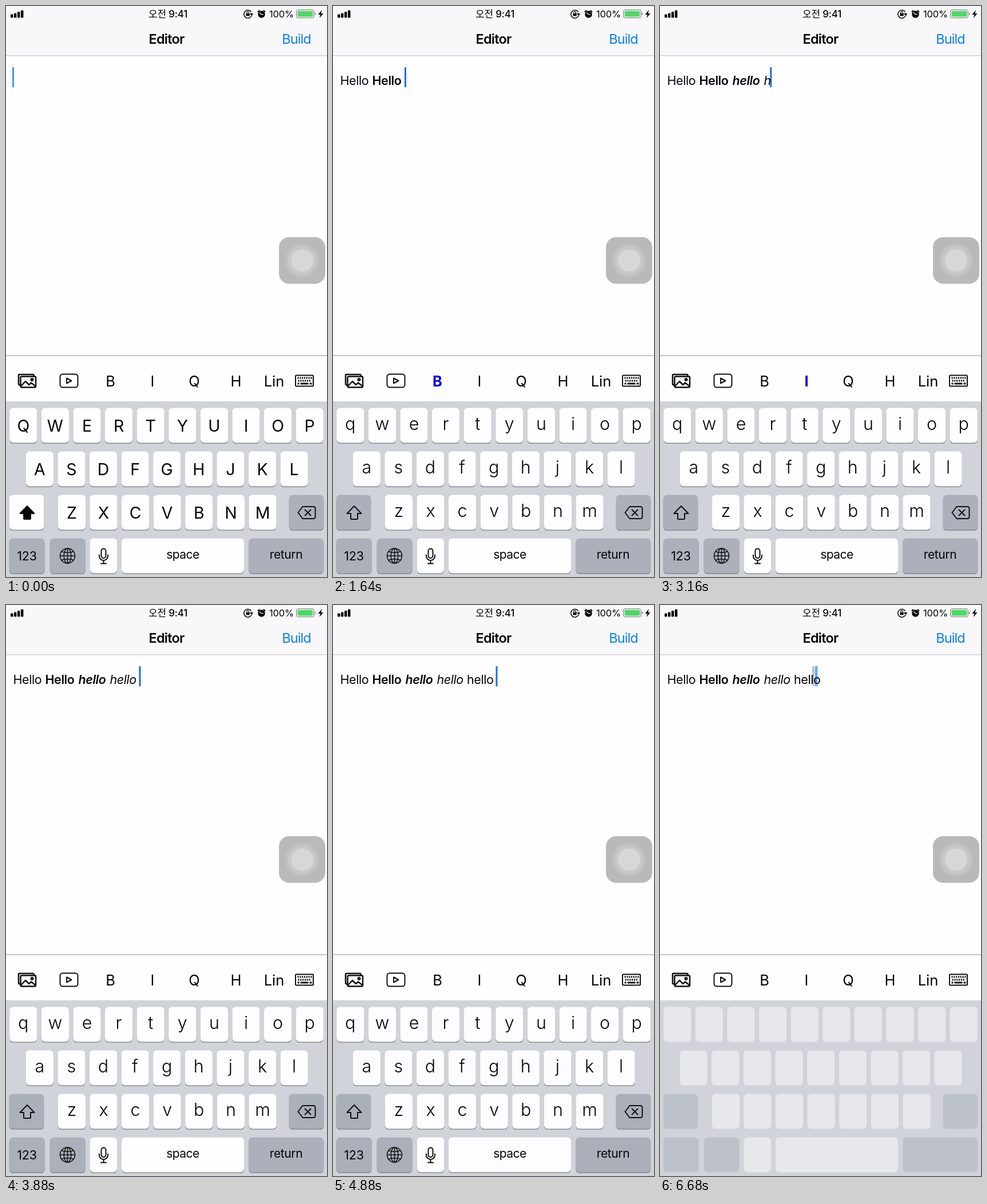
Recreate the animation shown at these times as an HTML page. Size 561x998 px, loop 6.72 s.

```html
<!DOCTYPE html>
<html lang="ko">
<head>
<meta charset="utf-8">
<title>Editor</title>
<style>
  html, body { margin: 0; width: 100%; height: 100%; overflow: hidden; background: #fefdff; }
  svg { display: block; width: 561px; height: 998px; }
  text { font-family: Inter, "Noto Sans CJK KR", "Noto Sans CJK", sans-serif; fill: #050506; white-space: pre; }
  .mid { text-anchor: middle; }
  .line { fill: none; stroke: #111; stroke-width: 2; stroke-linecap: round; stroke-linejoin: round; }
  #popup { filter: drop-shadow(0 1px 2px #0006); }
</style>
</head>
<body>
<svg viewBox="0 0 561 998">
  <rect width="561" height="998" fill="#fefdff"/>
  <rect width="561" height="86" fill="#f8f7f9"/>
  <rect y="86" width="561" height="1.5" fill="#cfced1"/>

  <!-- status bar -->
  <g id="signal"></g>
  <g class="line">
    <path d="M428.3 10A7 7 0 1 0 429 17.5M427 13.5h4l-1.5 2.5z" style="stroke-width:1.6"/>
    <path d="M420.8 13v-1.5a1.8 1.8 0 0 1 3.6 0V13" style="stroke-width:1.3"/>
  </g>
  <rect x="419.5" y="13" width="6.2" height="4.6" rx=".8"/>
  <circle cx="446.5" cy="14.5" r="6.2"/>
  <path d="M440.5 10l2-2M452.5 10l-2-2" class="line"/>
  <path d="M443.5 12l3 2.7h3" class="line" style="stroke:#f8f7f9;stroke-width:1.3"/>
  <rect x="507.7" y="6.7" width="30.6" height="14" rx="3.5" fill="none" stroke="#8c8c8e" stroke-width="1.3"/>
  <rect x="509.7" y="8.7" width="26.6" height="10" rx="2" fill="#4cd964"/>
  <path d="M539.8 11.5q2 .5 2 2.3t-2 2.3z" fill="#8c8c8e"/>
  <path d="M552 7l-6.5 8h4l-1.500 6 6.500-8h-4z"/>

  <!-- editor -->
  <rect id="ghost" y="107" width="3" height="35" fill="#b3b2b6"/>
  <rect id="caret" y="107" height="35"/>
  <g id="words"></g>
  <rect x="477" y="404" width="81" height="81.5" rx="18" fill="#b9b8ba"/>
  <circle cx="517.5" cy="445" r="30" fill="#c0bfc1"/>
  <circle cx="517.5" cy="445" r="25" fill="#c8c7c9"/>
  <circle cx="517.5" cy="445" r="19.5" fill="#d7d6d9"/>

  <!-- toolbar -->
  <rect y="610.5" width="561" height="1.3" fill="#a9a8ac"/>
  <g class="line">
    <g style="stroke-width:2.5">
      <path d="M25 662.500h-1.500l-1.500-1.500v-15.500q0-1.500 1.500-1.500h23.500q1.500 0 1.500 1.500v1.500"/>
      <rect x="25.500" y="647.500" width="26.500" height="19" rx="2"/>
      <path d="M26.500 664l7.500-8 6 6 4-3.500 7.500 6"/>
      <circle cx="45.500" cy="653" r="1.800"/>
    </g>
    <rect x="94.500" y="643.500" width="31" height="23" rx="4.500"/>
    <path d="M106 650.500v9l8.500-4.500z"/>
    <rect x="506" y="645.500" width="31" height="19" rx="1.500"/>
    <g style="stroke-width:3;stroke-linecap:butt">
      <path d="M509.500 650h25M510.500 655h23" stroke-dasharray="2.200 1.600"/>
      <path d="M509.500 660h3M514.500 660h14M530.500 660h4"/>
    </g>
  </g>
  <g id="tools"></g>

  <!-- keyboard -->
  <rect y="691" width="561" height="307" fill="#d1d3da"/>
  <g id="shadows"></g>
  <g id="keys"></g>
  <g id="glyphs">
    <path id="shift" class="line" d="M37 874l12.500 13h-6.500v8.500q0 1.500-1.500 1.500h-9q-1.500 0-1.500-1.500V887h-6.500z"/>
    <g class="line">
      <path d="M518.500 875h18.500q3.500 0 3.500 3.500v14q0 3.500-3.500 3.500h-18.500l-8-10.500z"/>
      <path d="M522.500 880.500l10 10M532.500 880.500l-10 10"/>
      <g style="stroke-width:1.500">
        <circle cx="107.500" cy="961" r="13"/>
        <ellipse cx="107.500" cy="961" rx="6.300" ry="13"/>
        <path d="M107.500 948v26M94.500 961h26M97 953.500q10.500 4 21 0M97 968.500q10.500-4 21 0"/>
      </g>
      <rect x="166.500" y="948.500" width="8" height="16.500" rx="4"/>
      <path d="M163 959.500v2a7.500 7.500 0 0 0 15 0v-2M170.500 969v5.500M166 974.500h9"/>
    </g>
  </g>
  <!-- balloon over a held key, origin at the top centre of the key -->
  <g id="popup">
    <path fill="#fefdff" d="M-24 54V14C-24 2-34 0-34-14V-66Q-34-77-23-77H23Q34-77 34-66V-14C34 0 24 2 24 14V54Q24 61 17 61H-17Q-24 61-24 54z"/>
  </g>
</svg>
<script>
const LOOP = 6720, BLUE = '#0000ea', DARK = '#abb0ba', WHITE = '#fefdff';
const KEY_W = 48.2, PITCH = 55.6;
const $ = id => document.getElementById(id);

function add(parent, tag, attrs, content = '') {
  const el = document.createElementNS('http://www.w3.org/2000/svg', tag);
  for (const k in attrs) el.setAttribute(k, attrs[k]);
  el.textContent = content;
  return ($(parent) || document.querySelector(parent)).appendChild(el);
}
const label = (parent, x, y, str, size, spacing = 0, more = {}) =>
  add(parent, 'text', { x, y, 'font-size': size, 'letter-spacing': spacing, class: 'mid', ...more }, str);

function addKey(x, y, w, fill = WHITE) {
  const box = { x, y, width: w, height: 61, rx: 6.5 };
  add('shadows', 'rect', { ...box, y: y + 1.6, fill: '#898b90' });
  return add('keys', 'rect', { ...box, fill });
}

// Static parts
[6, 8, 10.5, 13].forEach((h, i) =>
  add('signal', 'rect', { x: 8 + i * 6, y: 20.5 - h, width: 4.4, height: h, rx: 1.3 }));
label('svg', 283, 20, '오전 9:41', 17, -0.2, { 'font-weight': 500 });
label('svg', 481.5, 20, '100%', 16.5, -0.2);
label('svg', 280.5, 65.5, 'Editor', 23.5, -0.8, { 'font-weight': 600 });
label('svg', 507.5, 65.5, 'Build', 23.5, -0.9, { style: 'fill:#0a7ff0' });

const [toolB, toolI] = [['B', 182.5], ['I', 256], ['Q', 329], ['H', 402], ['Lin', 468.5]]
  .map(([s, x]) => label('tools', x, 664.5, s, 25.5));

const letters = [];
[['qwertyuiop', 6.2], ['asdfghjkl', 34.7], ['zxcvbnm', 90.8]].forEach(([row, left], r) =>
  [...row].forEach((ch, i) => {
    const x = left + i * PITCH, y = 702.5 + r * 76, mid = x + KEY_W / 2;
    addKey(x, y, KEY_W);
    letters.push({ ch, r, y, mid, el: label('glyphs', mid, 0, ch, 30) });
  }));

const shiftKey = addKey(5.7, 854.5, 60.6, DARK);
addKey(494.7, 854.5, 60.6, DARK);
addKey(5.7, 930.5, 62, DARK);
addKey(76.7, 930.5, 62, DARK);
addKey(146.7, 930.5, 47.3);
const spaceKey = addKey(202, 930.5, 214);
addKey(424.3, 930.5, 131, DARK);
label('glyphs', 36.5, 968.5, '123', 21.5, -0.2);
label('glyphs', 309, 966, 'space', 21, -0.5);
label('glyphs', 489.5, 966, 'return', 21, -0.4);
const popupText = label('popup', 0, -30, '', 45, 0, { 'font-weight': 300 });

// Typed words: left edge, time of the first letter, style
const STEP = 104, HOLD = 80;
const words = [
  { s: 'Hello', x: 12.5, at: 140 },
  { s: 'Hello', x: 68.5, at: 1120, bold: true },
  { s: 'hello', x: 126.5, at: 2340, bold: true, italic: true },
  { s: 'hello', x: 181.5, at: 3160, italic: true },
  { s: 'hello', x: 234, at: 4000 }
];
const stops = [];
for (const w of words) {
  w.el = add('words', 'text', {
    x: w.x, y: 138, 'font-size': 21.5, 'letter-spacing': -0.42,
    'font-weight': w.bold ? 600 : 400, 'font-style': w.italic ? 'italic' : 'normal'
  }, w.s);
  for (let j = 0; j < 6; j++) stops.push(w.x + (j && w.el.getSubStringLength(0, j)));
}
stops.push(stops[stops.length - 1] + 5.5);

// Character inserted when the key held at time t is released
function heldChar(t) {
  for (const w of words) {
    const j = Math.ceil((t - w.at) / STEP);
    if (j >= 0 && j < 6 && w.at + j * STEP - t <= HOLD) return (w.s + ' ')[j];
  }
  return '';
}

// Free caret movement while the keyboard acts as a trackpad
const LIFT = 4880;
const path = [[5100, 286], [5520, 146], [6120, 67], [6260, 9.5], [6680, 273], [LOOP, 276]];
function floatX(t) {
  const i = Math.max(1, path.findIndex(p => p[0] > t));
  const [t0, x0] = path[i - 1], [t1, x1] = path[i];
  return x0 + (x1 - x0) * Math.max(0, (t - t0) / (t1 - t0));
}
const nearest = x => stops.reduce((best, s, i) =>
  Math.abs(s - x) < Math.abs(stops[best] - x) ? i : best, 0);

function setTool(el, on) {
  el.style.fill = on ? BLUE : '';
  el.style.fontWeight = on ? 700 : 400;
}

function drawEditor(t) {
  let pos = 0;
  for (const w of words) {
    const n = Math.max(0, Math.min(6, Math.floor((t - w.at) / STEP) + 1));
    w.el.textContent = w.s.slice(0, n);
    pos += n;
  }
  let bold = t >= 760 && t < 3000, italic = t >= 1960 && t < 3820;
  const floating = t >= path[0][0];
  let x = stops[pos];
  if (floating) {
    x = floatX(t);
    pos = nearest(x);
    ({ bold, italic } = words[Math.floor(Math.max(0, pos - 1) / 6)]);
  }
  const wide = floating ? 4.5 : 3;
  $('caret').setAttribute('x', x - wide / 2);
  $('caret').setAttribute('width', wide);
  $('caret').setAttribute('fill', floating ? '#5aacff' : '#1672e0');
  $('caret').setAttribute('opacity', Math.min(1, 0.75 + t / 640));
  $('ghost').setAttribute('x', stops[pos] - 1.5);
  $('ghost').setAttribute('visibility', floating ? 'visible' : 'hidden');
  setTool(toolB, bold);
  setTool(toolI, italic);
}

function drawKeyboard(t) {
  const upper = t < words[0].at || (t >= 960 && t < words[1].at);
  const cased = ch => upper ? ch.toUpperCase() : ch;
  for (const { ch, r, el } of letters) {
    el.textContent = cased(ch);
    el.setAttribute('y', (upper ? 743.5 : 741) + r * 76);
    el.setAttribute('font-size', upper ? 28.5 : 30.5);
    el.setAttribute('font-weight', upper ? 380 : 350);
  }
  shiftKey.setAttribute('fill', upper ? WHITE : DARK);
  $('shift').style.fill = upper ? '#000' : 'none';

  const held = heldChar(t), key = letters.find(l => l.ch === held.toLowerCase());
  spaceKey.setAttribute('fill', held === ' ' ? DARK : WHITE);
  $('popup').setAttribute('visibility', key ? 'visible' : 'hidden');
  if (key) {
    $('popup').setAttribute('transform', `translate(${key.mid} ${key.y})`);
    popupText.textContent = cased(key.ch);
  }

  const fade = Math.max(0, Math.min(1, (t - LIFT) / 200));
  $('glyphs').setAttribute('opacity', 1 - fade);
  $('shadows').setAttribute('opacity', 1 - fade);
  $('keys').setAttribute('opacity', 1 - fade / 2);
}

const start = performance.now();
function tick() {
  const t = (performance.now() - start) % LOOP;
  drawEditor(t);
  drawKeyboard(t);
  requestAnimationFrame(tick);
}
tick();
</script>
</body>
</html>
```
